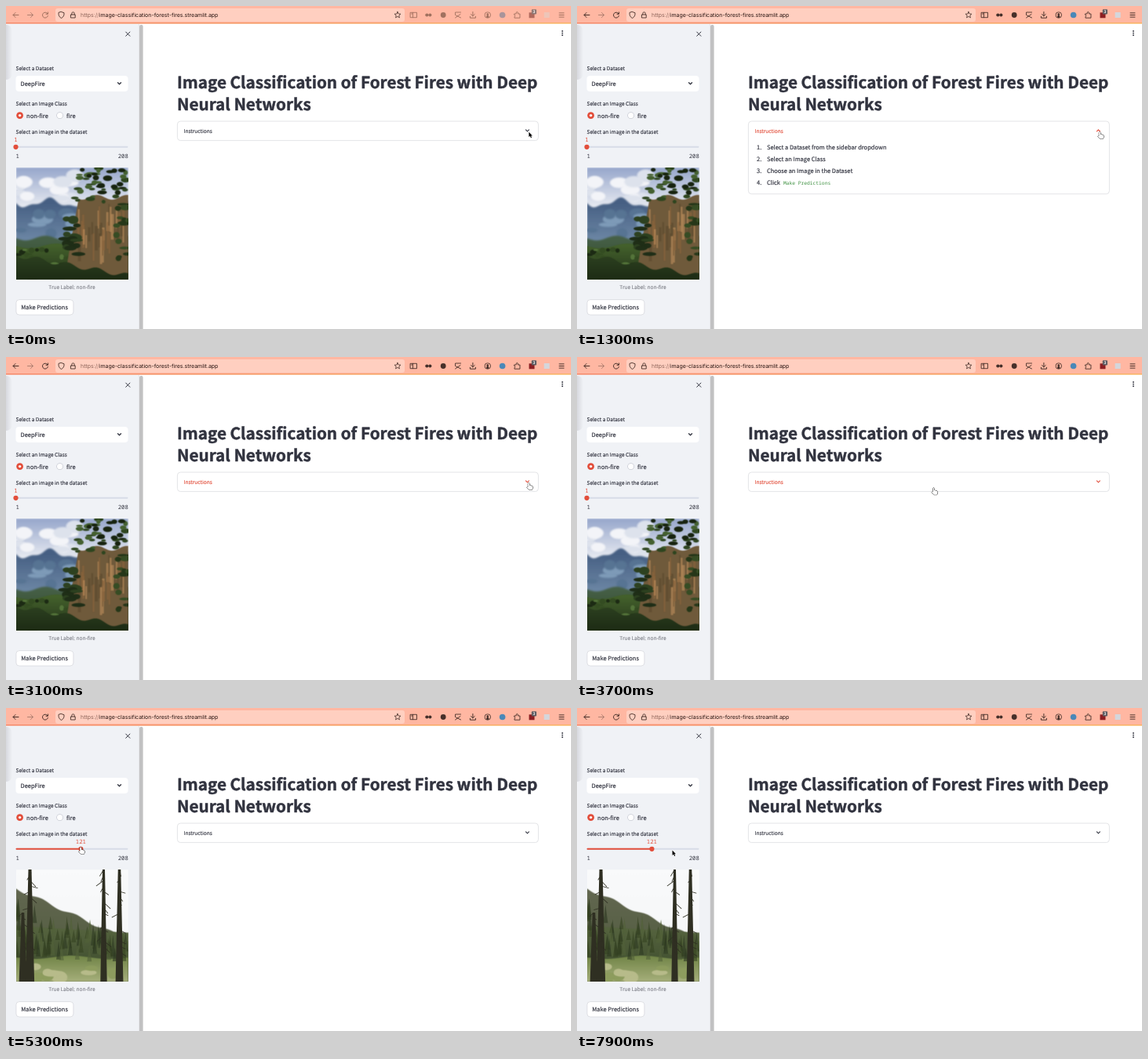
An HTML page with a canvas for the animation above (8 s loop, 720 by 412 pixels).

```html
<!DOCTYPE html>
<html lang="en">
<head>
<meta charset="utf-8">
<title>Image Classification of Forest Fires</title>
<style>
html, body { margin: 0; width: 100%; height: 100%; overflow: hidden; background: #fff; }
canvas { display: block; width: 720px; height: 412px; }
</style>
</head>
<body>
<canvas id="stage"></canvas>
<script>
const LOOP = 8000, W = 720, H = 412, BAR = 23, PHOTO = 143;
const SANS = '"Noto Sans CJK JP", "Noto Sans CJK SC", "Open Sans", sans-serif';
const MONO = '"Noto Sans Mono", "DejaVu Sans Mono", monospace';
const INTER = 'Inter, Roboto, sans-serif';
const INK = '#31333f', RED = '#e24e3b';
const SMALL = 6.54, BODY = 7.475, TITLE = 20.66;

// Moments of the story, in ms
const PRESS = 550, FOCUS = 950, EXPAND = 1000, COLLAPSE = 2600;
const TO_SLIDER = 3350, PICK = 4800, LOADED = 5250, TO_PHOTO = 5450, TO_REST = 6450;
const GLIDE = 850, FOLD = 450;

const canvas = document.getElementById('stage');
const ratio = window.devicePixelRatio || 1;
canvas.width = W * ratio;
canvas.height = H * ratio;
const ctx = canvas.getContext('2d');

const clamp = v => Math.max(0, Math.min(1, v));
const mix = (a, b, k) => a + (b - a) * k;
const smooth = k => k * k * (3 - 2 * k);
const easeOut = k => 1 - Math.pow(1 - k, 4);
const progress = (t, start, span) => clamp((t - start) / span);
const inside = (p, x, y, w, h) => p.x > x && p.x < x + w && p.y > y && p.y < y + h;

function seeded(seed) {
  const next = () => (seed = (seed * 16807) % 2147483647) / 2147483647;
  return (lo, hi) => mix(lo, hi, next());
}

function text(str, x, y, size, { color = INK, family = SANS, weight = 400, align = 'left' } = {}) {
  ctx.font = `${weight} ${size}px ${family}`;
  ctx.textAlign = align;
  ctx.fillStyle = ctx.strokeStyle = color;
  ctx.fillText(str, x, y);
  if (family === SANS) {
    ctx.lineWidth = size * 0.022;
    ctx.strokeText(str, x, y);
  }
}

function box(x, y, w, h, r, fill, stroke) {
  ctx.beginPath();
  ctx.roundRect(x, y, w, h, r);
  if (fill) { ctx.fillStyle = fill; ctx.fill(); }
  if (stroke) { ctx.strokeStyle = stroke; ctx.lineWidth = 0.8; ctx.stroke(); }
}

function disc(x, y, r, fill) {
  ctx.beginPath();
  ctx.arc(x, y, r, 0, 7);
  ctx.fillStyle = fill;
  ctx.fill();
}

function icon(x, y, d, color, { width = 1, fill, turn = 0 } = {}) {
  const p = new Path2D(d);
  ctx.save();
  ctx.translate(x, y);
  ctx.rotate(turn);
  ctx.lineCap = ctx.lineJoin = 'round';
  if (color) { ctx.strokeStyle = color; ctx.lineWidth = width; ctx.stroke(p); }
  if (fill) { ctx.fillStyle = fill; ctx.fill(p); }
  ctx.restore();
}

/* ---------- photos as soft flat shapes ---------- */

function photo(seed, paint) {
  const c = document.createElement('canvas');
  c.width = c.height = PHOTO * 2;
  const g = c.getContext('2d');
  const rnd = seeded(seed);
  g.scale(2, 2);
  paint({
    g, rnd,
    // Fills between the curve y(x) and a level edge.
    land(top, bottom, y, edge = PHOTO) {
      const f = g.createLinearGradient(0, Math.min(y(0), edge), 0, Math.max(y(0), edge));
      f.addColorStop(0, top);
      f.addColorStop(1, bottom);
      g.fillStyle = f;
      g.beginPath();
      g.moveTo(0, edge);
      for (let x = 0; x <= PHOTO; x++) g.lineTo(x, y(x));
      g.lineTo(PHOTO, edge);
      g.fill();
    },
    tufts(n, colors, x0, x1, y0, y1, size) {
      for (let i = 0; i < n; i++) {
        g.fillStyle = colors[i % colors.length];
        g.beginPath();
        g.ellipse(rnd(x0, x1), rnd(y0, y1), size * rnd(0.6, 1.6), size * rnd(0.3, 0.9), 0, 0, 7);
        g.fill();
      }
    }
  });
  return c;
}

const cliff = photo(41, ({ g, rnd, land, tufts }) => {
  const wave = (x, a, len) => a * Math.sin(x / len);
  g.filter = 'blur(2px)';
  land('#96a6cb', '#e8ebf2', () => 0, 50);
  tufts(14, ['#f3f4f8', '#dde2ec'], 0, 80, 10, 40, 9);
  land('#465f83', '#94b0c8', x => 45 + wave(x, 5, 9) + wave(x, 2, 4));
  tufts(10, ['#7e9bb8', '#577493'], 0, 75, 58, 90, 9);
  land('#466047', '#2f4627', x => 90 + wave(x, 3, 8));
  g.filter = 'blur(1px)';
  land('#43602b', '#22311a', x => 100 + wave(x, 3, 11));
  tufts(45, ['#54743a', '#1c2a14', '#344c22'], 0, 80, 104, 143, 4);
  land('#6f5a3b', '#b18458', x => 38 + wave(x, 3, 6) + Math.max(0, 80 - x) * 6);
  for (let i = 0; i < 34; i++) {
    g.fillStyle = ['#c9976388', '#5a482d99', '#8d653d99'][i % 3];
    g.fillRect(rnd(78, 136), rnd(45, 92), rnd(1.5, 4), rnd(14, 36));
  }
  land('#2c4020', '#1d2b14', x => 112 + x * 0.18 + wave(x, 3, 6));
  land('#1e2d16', '#2a3d1c', x => x < 74 ? 0 : 40 + wave(x, 5, 5), 0);
  tufts(45, ['#446030', '#17230f', '#2e451f'], 74, 143, 0, 46, 4);
  tufts(16, ['#1f2e17', '#2d4120'], 58, 80, 62, 116, 6);
  tufts(14, ['#263719', '#364c24'], 128, 143, 45, 120, 5);
});

const forest = photo(77, ({ g, rnd, land, tufts }) => {
  g.filter = 'blur(1px)';
  land('#f9fafb', '#f4f5f6', () => 0);
  land('#626750', '#4d593b', x => 24 + x * 0.46 + 2 * Math.sin(x / 7));
  land('#56643f', '#39482a', x => 72 + x * 0.06);
  land('#74874a', '#a6af7b', x => 112 + 2 * Math.sin(x / 15));
  tufts(10, ['#b7bb8a', '#8d9c5e'], 25, 125, 122, 138, 9);
  g.filter = 'blur(.5px)';
  for (let i = 0; i < 90; i++) {
    const x = rnd(0, PHOTO), base = mix(60 + x * 0.3, 118, i / 90), h = rnd(14, 30);
    g.fillStyle = ['#35432299', '#52603899', '#2d392299'][i % 3];
    g.beginPath();
    g.moveTo(x, base - h);
    g.lineTo(x + 3, base);
    g.lineTo(x - 3, base);
    g.fill();
  }
  for (const [x, wide] of [[9, 7], [18, 8], [112, 6], [132, 7]]) {
    const top = x < 10 ? 55 : 0;
    g.fillStyle = g.strokeStyle = '#2f2f22';
    g.lineWidth = 0.8;
    g.beginPath();
    g.moveTo(x - wide / 4, top);
    g.lineTo(x + wide / 4, top);
    g.lineTo(x + wide * 0.7, PHOTO);
    g.lineTo(x - wide * 0.7, PHOTO);
    g.fill();
    for (let y = top; y < 110; y += 7) {
      g.beginPath();
      g.moveTo(x, y);
      g.lineTo(x + rnd(-10, 10), y + rnd(2, 9));
      g.stroke();
    }
  }
});

/* ---------- browser bar ---------- */

function browserBar(active) {
  const y = 11.5, dark = '#46302a', pale = '#b07f70';
  const ink = active ? dark : '#a1715f';
  const thin = { width: 0.9 };
  ctx.fillStyle = '#ffb7a2';
  ctx.fillRect(0, 0, W, 22);
  const line = ctx.createLinearGradient(0, 0, W, 0);
  line.addColorStop(0, '#f07a58');
  line.addColorStop(1, '#f8b052');
  ctx.fillStyle = line;
  ctx.fillRect(0, 21.3, W, 1.3);
  box(63, 3, 445, 17, 3, '#ffcfc0');

  const arrow = 'M3.5 0h-7l3-3m-3 3l3 3';
  icon(12.5, y, arrow, ink);
  icon(31, y, arrow, pale, { turn: Math.PI });
  icon(50, y, 'M3-1.7A3.5 3.5 0 1 0 3.4 1M3.4-3.6v2.4h-2.4', ink);
  icon(70.5, y, 'M0-4L3.5-2.8Q4 2 0 4Q-4 2-3.5-2.8Z', dark, thin);
  icon(85.5, y, 'M-2.7-.5h5.4v4h-5.4ZM-1.7-.5v-1.5a1.7 1.7 0 0 1 3.4 0v1.5', dark, thin);
  let star = '';
  for (let i = 0; i < 10; i++) {
    const r = i % 2 ? 1.9 : 4.2, a = i * Math.PI / 5;
    star += (i ? 'L' : 'M') + r * Math.sin(a) + ' ' + -r * Math.cos(a);
  }
  icon(499, y, star + 'Z', dark, { width: 0.8 });
  text('https://', 95, 14, 7.01, { color: '#8d6459', family: INTER });
  const start = 95 + ctx.measureText('https://').width;
  text('image-classification-forest-fires.streamlit.app', start, 14, 7.01, { color: '#25130f', family: INTER });

  // Tools stand at an even pitch.
  const slot = i => 519.5 + i * 18.85;
  icon(slot(0), y, 'M-4-3.2h8v6.4h-8ZM-1-3.2v6.4M-3-1.5h1', ink, thin);
  for (const side of [-1, 1]) disc(slot(1) + side * 2, y, 2.1, ink);
  disc(slot(2), y, 3.4, ink);
  icon(slot(3), y, 'M-3.5 0v-3.5h7M-3.5 3.5L3-1M-2.5 .5l6 3', ink, thin);
  icon(slot(4), y, 'M0-4v5.3l-2.3-2.3m2.3 2.3l2.3-2.3M-3.5 1.8v1.9h7v-1.9', ink);
  disc(slot(5), y, 4, ink);
  disc(slot(5), y, 3.2, '#ffb7a2');
  disc(slot(5), y - 0.8, 1.4, ink);
  disc(slot(5), y + 2, 1.7, ink);
  disc(slot(6), y, 3.8, active ? '#4a88b8' : '#a9949a');
  icon(slot(7), y, 'M-3.5-1.5h2.2q-.3-2.6 1.1-2.6t1.2 2.6h2.5v5.2h-7v-1.7q2.5-.9 0-2Z', ink, thin);
  box(slot(8) - 3.8, 8.3, 7, 7, 0, active ? '#8d1f22' : '#b0695c');
  box(slot(8) - 0.5, 4.2, 6.2, 6.3, 1, active ? '#5d5b60' : '#8d7672');
  text('3', slot(8) + 2.6, 9.3, 5, { color: '#fff', family: INTER, weight: 600, align: 'center' });
  box(slot(9) - 3.5, 8, 7, 7, 0, active ? '#d5d6dc' : '#eec5b8');
  icon(slot(10), y, 'M-3-2.6h6M-3 0h6M-3 2.6h6', ink);
}

/* ---------- page ---------- */

const CHEVRON = 'M-2-1l2 2l2-2';

function radio(x, label, on) {
  disc(x, 139.6, 4.4, on ? RED : '#c9ccd4');
  disc(x, 139.6, on ? 1.7 : 3.6, '#fff');
  text(label, x + 8.5, 142.6, BODY);
}

function slider(x, y, w, max, value) {
  const at = x + w * (value - 1) / (max - 1);
  box(x, y - 1, w, 2, 1, '#d8dce7');
  box(x, y - 1, at - x, 2, 1, RED);
  disc(at, y, 3.1, RED);
  text(value, Math.max(at, x - 0.8), y - 6.4, 7.3, { color: RED, family: MONO, align: 'center' });
  text(1, x, y + 14.2, 7.3, { family: MONO });
  text(max, x + w + 0.3, y + 14.2, 7.3, { family: MONO, align: 'right' });
}

function sidebar(t, overPhoto) {
  const x = 12.5;
  ctx.fillStyle = '#f0f2f6';
  ctx.fillRect(0, BAR, 170, H - BAR);
  const shade = ctx.createLinearGradient(0, 0, 8, 0);
  shade.addColorStop(0, 'rgba(150,150,160,.28)');
  shade.addColorStop(1, 'rgba(150,150,160,0)');
  box(0, 24, 8, 70, [0, 8, 8, 0], shade);

  icon(155.3, 35.7, 'M-2.6-2.6l5.2 5.2m0-5.2l-5.2 5.2', INK);
  text('Select a Dataset', x, 82.3, SMALL);
  box(x, 89, PHOTO, 20, 4, '#fff');
  text('DeepFire', x + 6, 101.9, BODY);
  icon(144.5, 98.8, CHEVRON, INK, { width: 1.3 });
  text('Select an Image Class', x, 126.8, SMALL);
  radio(17.6, 'non-fire', true);
  radio(68.6, 'fire', false);
  text('Select an image in the dataset', x, 163, SMALL);
  slider(x, 179.8, PHOTO, 208, t < PICK ? 1 : 121);

  ctx.drawImage(t < LOADED ? cliff : forest, x, 206, PHOTO, PHOTO);
  text('True Label: non-fire', x + PHOTO / 2, 361.4, SMALL, { color: '#83858d', align: 'center' });
  box(x + 0.4, 374.6, 73, 19.4, 4, '#fff', '#d7d8dd');
  text('Make Predictions', x + 6.8, 387.2, BODY);

  // Hovering the photo shows its enlarge button, cut off by the sidebar edge.
  if (overPhoto) {
    box(160, 203.5, 9.5, 17, [8, 0, 0, 8], '#fff');
    icon(167.3, 211, 'M.5-1l-1 1l1 1', INK);
  }
  ctx.fillStyle = '#e4e5e8';
  ctx.fillRect(169, BAR, 1, H - BAR);
  box(170, 24, 4.6, overPhoto ? 386.5 : H, 2, '#c1c1c2');
}

function mainPage(t, hover) {
  const x = 218;
  for (let i = -1; i < 2; i++) disc(709, 34.6 + i * 2.6, 0.95, INK);
  text('Image Classification of Forest Fires with Deep', x, 105, TITLE, { weight: 700 });
  text('Neural Networks', x, 132.6, TITLE, { weight: 700 });

  const open = easeOut(progress(t, EXPAND, FOLD)) - easeOut(progress(t, COLLAPSE, FOLD));
  const h = mix(24.6, 93.6, open);
  const pressed = t > PRESS && t < FOCUS;
  const color = hover ? RED : INK;
  box(x + 0.4, 147, 460, h, 4, '#fff', '#dcdde1');
  text('Instructions', x + 8.5, 161.9, SMALL, { color });
  if (pressed) disc(665.3, 158.6, 6, '#d3d3ec');
  icon(664.4, 158.8, CHEVRON, pressed ? '#3a3d78' : color, { width: 1.1, turn: Math.PI * open });

  ctx.save();
  ctx.beginPath();
  ctx.rect(x, 172, 460, h - 24.6);
  ctx.clip();
  const steps = ['Select a Dataset from the sidebar dropdown', 'Select an Image Class',
    'Choose an Image in the Dataset', 'Click'];
  steps.forEach((step, i) => {
    const y = 183.2 + i * 15;
    text(i + 1 + '.', x + 11, y, BODY);
    text(step, x + 24, y, BODY);
  });
  text('Make Predictions', x + 45, 228, 6.28, { color: '#3f9142', family: MONO });
  ctx.restore();
}

/* ---------- pointer ---------- */

function pointerAt(t) {
  const p = { x: 666.3, y: 160.8 };
  const glide = (start, x, y) => {
    const k = smooth(progress(t, start, GLIDE));
    p.x = mix(p.x, x, k);
    p.y = mix(p.y, y, k);
  };
  glide(TO_SLIDER, 95.3, 177.8);
  glide(TO_PHOTO, 46.3, 311.2);
  glide(TO_REST, 121.5, 181.6);
  return p;
}

function pointer({ x, y }, hand) {
  if (hand) {
    icon(x, y, 'M-1 5v-4.5q.9-1.4 1.8 0v2.5l3 .6q1.4.6 1.2 2.4l-1 2.6h-3.8l-2.6-3q-.1-1.3 1.4-.6Z',
      '#1a1a1a', { fill: '#fff' });
  } else {
    icon(x, y, 'M0 0v6.3l1.5-1.3l1.1 2.4l1.1-.5l-1.1-2.3h1.9Z', '#fff', { fill: '#000' });
  }
}

function draw(t) {
  ctx.setTransform(ratio, 0, 0, ratio, 0, 0);
  ctx.textRendering = 'geometricPrecision';
  ctx.fillStyle = '#fff';
  ctx.fillRect(0, 0, W, H);
  const active = t >= FOCUS;
  const p = pointerAt(t);
  const overHeader = active && inside(p, 218, 147, 461, 25);
  const overTrack = inside(p, 10, 176, 148, 5);
  sidebar(t, inside(p, 12, 206, PHOTO, PHOTO));
  mainPage(t, overHeader);
  browserBar(active);
  pointer(p, overHeader || overTrack);
}

function frame(now) {
  draw(now % LOOP);
  requestAnimationFrame(frame);
}
requestAnimationFrame(frame);
</script>
</body>
</html>
```
